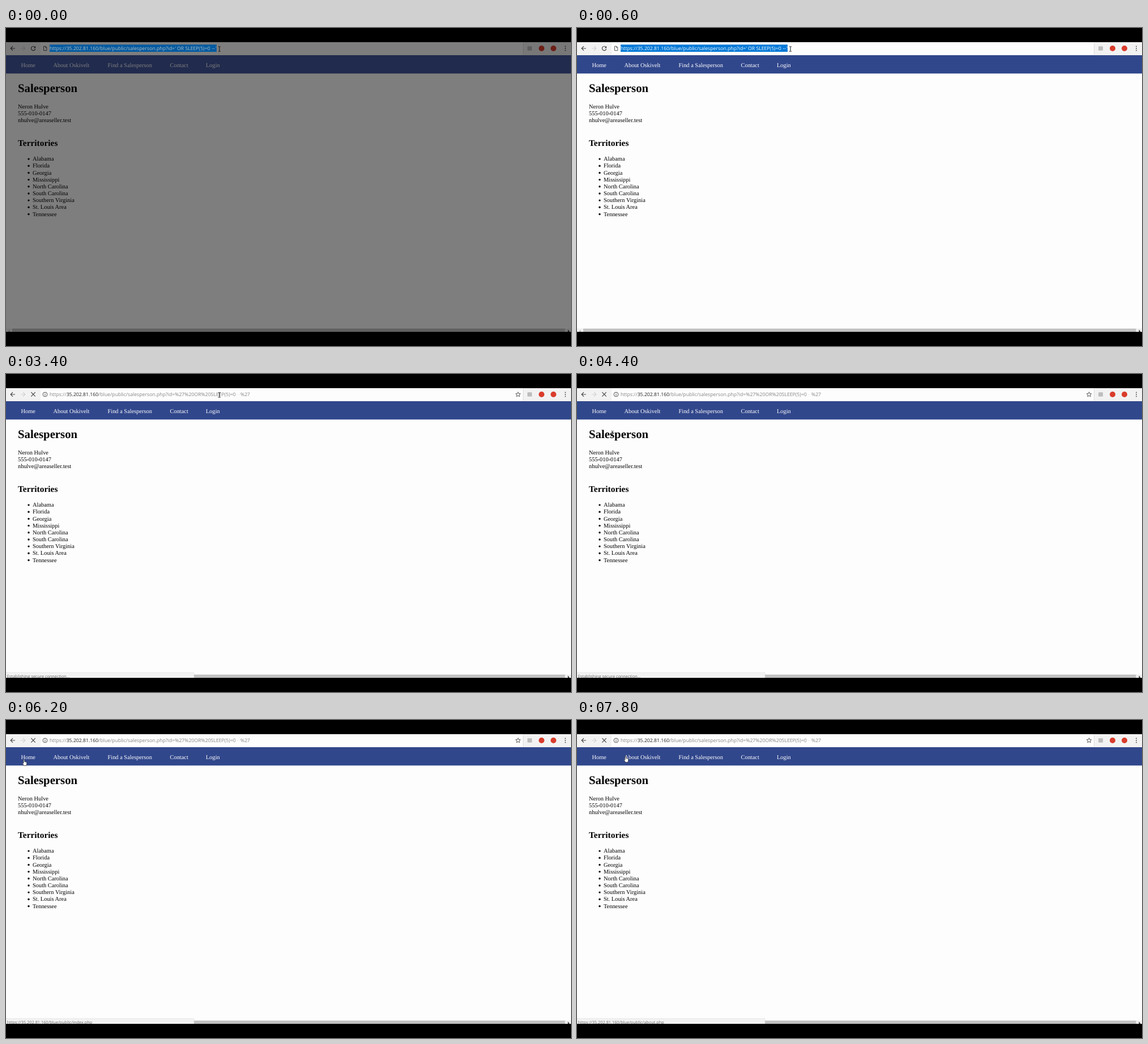
These frames come from a looping animation (998x561 px, 8 s). An HTML page:

```html
<!DOCTYPE html>
<html lang="en">
<head>
<meta charset="utf-8">
<title>Salesperson</title>
<style>
html, body { margin: 0; width: 100%; height: 100%; overflow: hidden; background: #000; }
svg { display: block; width: 998px; height: 561px; text-rendering: geometricPrecision; }
.page text { font: 10.4px "Liberation Serif", serif; fill: #000; }
.page .h1 { font-size: 20.8px; font-weight: bold; }
.page .h2 { font-size: 15.4px; font-weight: bold; }
.page .nav text { fill: #fff; }
.url text { font: 8.7px "Open Sans", sans-serif; fill: #858585; }
.url .host { fill: #222; }
.url .faint { fill: #c4c4c4; }
.url.selected text, .url.selected tspan { fill: #fff; }
.status text { font: 7.34px "Open Sans", sans-serif; fill: #666; }
.line { fill: none; stroke: #444; stroke-width: 1.2; }
</style>
</head>
<body>
<svg viewBox="0 0 998 561">
  <defs><clipPath id="view"><rect y="25" width="998" height="511"/></clipPath></defs>
  <rect width="998" height="561"/>
  <g clip-path="url(#view)">
    <g class="page">
      <rect y="25" width="998" height="511" fill="#fdfdfd"/>
      <g class="nav"><rect id="navBar" y="48" width="998" height="32.3" fill="#31478c"/></g>
      <text class="h1" x="21" y="113">Salesperson</text>
      <text class="h2" x="21" y="208">Territories</text>
    </g>

    <rect y="25" width="998" height="23" fill="#f2f2f2"/>
    <rect x="61" y="25" width="852" height="22.5" fill="#fdfdfd"/>
    <path d="M913.5 26V47" stroke="#ddd"/>
    <path class="line" d="M16 36H8.3M12 32.2L8.2 36L12 39.8"/>
    <path class="line" style="stroke:#d0d0d0" d="M26 36H33.7M30 32.2L33.8 36L30 39.8"/>
    <g id="idle">
      <path class="line" d="M51 33.6A3.7 3.7 0 1 0 51.7 37"/>
      <path d="M52.2 31.8V35.4H48.6Z" fill="#444"/>
      <path class="line" style="stroke-width:.9" d="M66.5 32.2H69.8L71.8 34.2V39.8H66.5ZM69.6 32.4V34.4H71.6"/>
    </g>
    <g id="busy">
      <path class="line" d="M44.4 32.2L51.8 39.6M51.8 32.2L44.4 39.6"/>
      <circle class="line" style="stroke-width:.9" cx="69" cy="36" r="3.9"/>
      <path class="line" style="stroke-width:1" d="M69 35.4V38.2M69 33.6V34.5"/>
      <path id="star" class="line" style="stroke-width:.9"/>
    </g>
    <rect x="921" y="32.2" width="8" height="7.6" rx="1" fill="#bdbdbd"/>
    <circle cx="946" cy="36" r="5" fill="#d93c2c"/>
    <circle cx="967" cy="36" r="5" fill="#d93c2c"/>
    <g fill="#555"><circle cx="988" cy="32.5" r="1"/><circle cx="988" cy="36" r="1"/><circle cx="988" cy="39.5" r="1"/></g>

    <rect y="530" width="998" height="6" fill="#f1f1f1"/>
    <rect x="11" y="530.4" width="976.5" height="5.6" fill="#c1c1c1"/>
    <path d="M6.5 532.5V536H4.5V534.5Z" fill="#aaa"/>
    <path d="M992.5 532V536H995V534.8Z" fill="#333"/>
    <g id="status" class="status">
      <rect x="-1" y="526.8" width="333" height="12" fill="#f2f2f2" stroke="#dedede" stroke-width=".6"/>
      <text id="statusText" x="1.8" y="536"></text>
    </g>

    <rect id="shade" y="25" width="998" height="511" opacity=".5"/>

    <g id="rawUrl" class="url">
      <rect id="mark" x="77" y="29.3" width="295" height="12.7" fill="#0078d7"/>
      <text x="77" y="39">https://<tspan class="host">35.202.81.160</tspan>/blue/public/salesperson.php?id=<tspan class="faint">'</tspan><tspan x="302">OR SLEEP(5)=0</tspan><tspan class="faint" x="363.5">--</tspan><tspan x="370">'</tspan></text>
    </g>
    <g id="sentUrl" class="url">
      <text x="77" y="39">https://<tspan class="host">35.202.81.160</tspan>/blue/public/salesperson.php?id=%27%20OR%20SLEEP(5)=0<tspan class="faint" x="407.5" style="opacity:.4">--</tspan><tspan x="414">%27</tspan></text>
    </g>
    <rect id="caret" x="372" y="29" width="1" height="12" fill="#222"/>

    <g id="pointer">
      <path id="beam" d="M-2 -4.2H-.6L0 -3.6L.6 -4.2H2M0 -3.6V3.6M-2 4.2H-.6L0 3.6L.6 4.2H2" fill="none" stroke="#111" stroke-width="1"/>
      <path id="hand" d="M-2 -5Q-1 -6 -.2 -5V-1.4L2.8 -.7Q4 -.3 3.8 1L3 5.4H-1.4L-4 1.3Q-3.8 .2 -2 1.4Z" fill="#fff" stroke="#222" stroke-width=".7" stroke-linejoin="round"/>
      <path id="arrow" d="M-3 -5V4.5L-.8 2.5L.7 5.8L2.1 5.2L.7 2H3.7Z" fill="#fff" stroke="#111" stroke-width=".7"/>
    </g>
  </g>
</svg>
<script>
const LOOP = 8000, STEP = 200, SENT = 3200;
const $ = id => document.getElementById(id);
const show = (id, on) => { $(id).style.display = on ? '' : 'none'; };

function add(parent, tag, attrs, text) {
  const el = document.createElementNS('http://www.w3.org/2000/svg', tag);
  for (const key in attrs) el.setAttribute(key, attrs[key]);
  if (text) el.textContent = text;
  parent.append(el);
}

// label, text x, left and right edge of the link, file
const links = [
  ['Home', 26.5, 10, 68, 'index'],
  ['About Oskivelt', 83.5, 68, 164, 'about'],
  ['Find a Salesperson', 179.5, 164, 274, 'territories'],
  ['Contact', 289.5, 274, 337, 'contact'],
  ['Login', 353, 337, 394, 'login']
];
const contact = ['Neron Hulve', '555-010-0147', 'nhulve@areaseller.test'];
const areas = ['Alabama', 'Florida', 'Georgia', 'Mississippi', 'North Carolina',
  'South Carolina', 'Southern Virginia', 'St. Louis Area', 'Tennessee'];

const page = document.querySelector('.page'), nav = document.querySelector('.nav');
links.forEach(([label, x]) => add(nav, 'text', { x, y: 69 }, label));
contact.forEach((s, i) => add(page, 'text', { x: 21, y: 141.7 + i * 12.2 }, s));
areas.forEach((s, i) => {
  const y = 234.3 + i * 12.17;
  add(page, 'circle', { cx: 40, cy: y - 3.2, r: 1.7 });
  add(page, 'text', { x: 47, y }, s);
});

const starPoints = Array.from({ length: 10 }, (_, i) => {
  const r = i % 2 ? 2 : 4.5, a = i * Math.PI / 5;
  return (904.5 + r * Math.sin(a)).toFixed(2) + ' ' + (36.2 - r * Math.cos(a)).toFixed(2);
});
$('star').setAttribute('d', 'M' + starPoints.join('L') + 'Z');

// pointer path: time, x, y
const path = [
  [0, 377, 37], [3400, 377, 37], [4200, 68, 109], [4400, 62.5, 105],
  [5200, 217, 71], [5400, 221, 70], [6200, 33, 75], [7000, 215, 70], [7800, 87, 69]
];

function pointerAt(t) {
  const i = path.findIndex(p => p[0] > t);
  if (i < 0) return path[path.length - 1].slice(1);
  const [t0, x0, y0] = path[i - 1], [t1, x1, y1] = path[i];
  const k = (t - t0) / (t1 - t0), e = k * k * (3 - 2 * k);
  return [x0 + (x1 - x0) * e, y0 + (y1 - y0) * e];
}

function draw(t) {
  const dim = t < 200, sent = t >= SENT, selected = t < 2400;
  show('shade', dim);
  $('navBar').setAttribute('fill', dim ? '#42579c' : '#31478c');
  show('mark', selected);
  $('rawUrl').setAttribute('class', selected ? 'url selected' : 'url');
  $('rawUrl').style.filter = dim ? 'brightness(.75)' : '';
  show('rawUrl', !sent);
  show('sentUrl', sent);
  show('idle', !sent);
  show('busy', sent);
  show('status', sent);
  show('caret', t >= 2800 && !sent);

  const [x, y] = pointerAt(t);
  const link = y > 48 && y < 82 && links.find(l => x >= l[2] && x < l[3]);
  const overText = y < 48 || (x > 20 && x < 128 && y > 95 && y < 118);
  $('pointer').setAttribute('transform', `translate(${x} ${y})`);
  show('hand', link);
  show('beam', !link && overText);
  show('arrow', !link && !overText);
  $('statusText').textContent = link
    ? `https://35.202.81.160/blue/public/${link[4]}.php`
    : 'Establishing secure connection...';
}

const start = performance.now();
let last = -1;
function tick() {
  const t = Math.floor((performance.now() - start) % LOOP / STEP) * STEP;
  if (t !== last) draw(last = t);
  requestAnimationFrame(tick);
}
tick();
</script>
</body>
</html>
```
